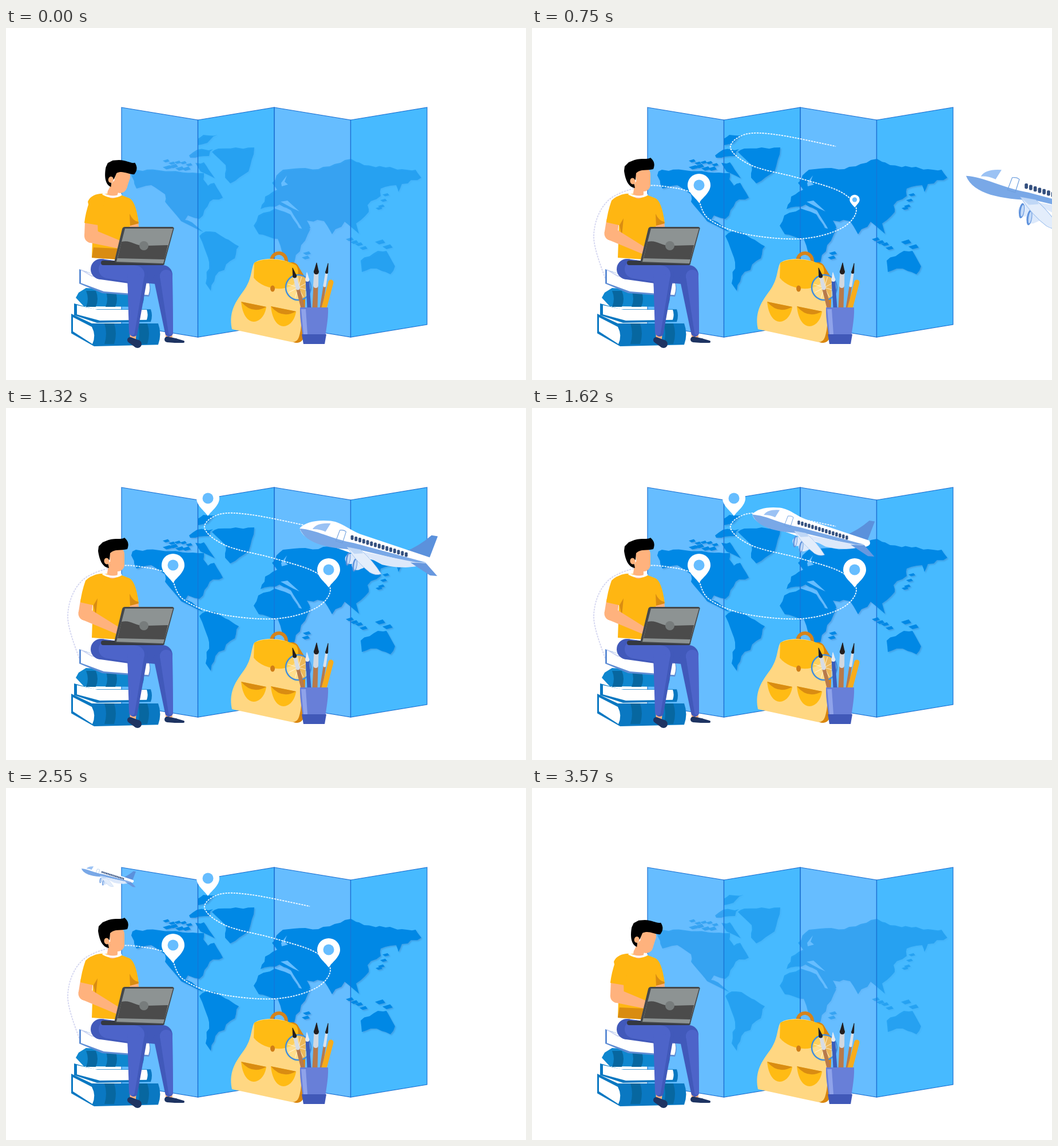
Animation of 909 by 616 pixels, one loop 3.6 s. Source, as an HTML page with a canvas:

```html
<!DOCTYPE html>
<html lang="en">
<head>
<meta charset="utf-8">
<style>
html, body { margin: 0; width: 100%; height: 100%; overflow: hidden; background: #fff; }
canvas { display: block; width: 909px; height: 616px; }
</style>
</head>
<body>
<canvas id="stage" width="909" height="616"></canvas>
<script>
const ctx = document.getElementById('stage').getContext('2d');
const LOOP = 3600;
const SKIN = '#ffb27d', SHIRT = '#ffb612', SHADE = '#d98c12';
const COVER = '#0a78c2', TEAL = '#0767a0', JEANS = '#4d64c9', JEANS_DARK = '#4159ba';

const clamp = v => Math.max(0, Math.min(1, v));
const ease = v => { v = clamp(v); return v * v * (3 - 2 * v); };
const mix = (a, b, k) => a.map((v, i) => v + (b[i] - v) * k);

const paths = new Map();
function shape(d) {
  if (d instanceof Path2D) return d;
  if (!paths.has(d)) paths.set(d, new Path2D(d));
  return paths.get(d);
}
function fill(color, d) {
  ctx.fillStyle = color;
  ctx.fill(shape(d));
}
function stroke(color, width, d) {
  ctx.strokeStyle = color;
  ctx.lineWidth = width;
  ctx.stroke(shape(d));
}
function ellipse(color, x, y, rx, ry = rx, turn = 0) {
  ctx.fillStyle = color;
  ctx.beginPath();
  ctx.ellipse(x, y, rx, ry, turn, 0, Math.PI * 2);
  ctx.fill();
}
function group(draw) {
  ctx.save();
  draw();
  ctx.restore();
}
function pairs(text) {
  const n = text.trim().split(/\s+/).map(Number);
  return Array.from({ length: n.length / 2 }, (_, i) => [n[2 * i], n[2 * i + 1]]);
}

// Tapered tube through joints [x, y, radius].
function limb(color, ...joints) {
  joints.forEach(([x, y, r], i) => {
    ellipse(color, x, y, r);
    if (!i) return;
    const [px, py, pr] = joints[i - 1];
    const a = Math.atan2(y - py, x - px) + Math.PI / 2, c = Math.cos(a), s = Math.sin(a);
    ctx.beginPath();
    ctx.moveTo(px + c * pr, py + s * pr);
    ctx.lineTo(x + c * r, y + s * r);
    ctx.lineTo(x - c * r, y - s * r);
    ctx.lineTo(px - c * pr, py - s * pr);
    ctx.fill();
  });
}

// Smooth curve through a few points.
function curve(text) {
  const p = pairs(text), path = new Path2D();
  const at = i => p[Math.max(0, Math.min(p.length - 1, i))];
  path.moveTo(...p[0]);
  for (let i = 0; i < p.length - 1; i++) {
    const [a, b, c, d] = [at(i - 1), at(i), at(i + 1), at(i + 2)];
    path.bezierCurveTo(b[0] + (c[0] - a[0]) / 6, b[1] + (c[1] - a[1]) / 6,
      c[0] - (d[0] - b[0]) / 6, c[1] - (d[1] - b[1]) / 6, ...c);
  }
  return path;
}

// Coastlines: a rough outline, broken up by small seeded bays.
let seed = 7;
function random() {
  seed = seed * 16807 % 2147483647;
  return seed / 2147483647;
}
function addCoast(path, text) {
  const p = pairs(text);
  p.forEach((a, i) => {
    const b = p[(i + 1) % p.length];
    const steps = Math.ceil(Math.hypot(b[0] - a[0], b[1] - a[1]) / 11);
    for (let j = 0; j < steps; j++) {
      const wobble = j ? random() * 4 - 2 : 0;
      const [x, y] = mix(a, b, j / steps);
      path[i || j ? 'lineTo' : 'moveTo'](x + wobble, y + wobble);
    }
  });
  path.closePath();
}
function addIslands(path, count, x, y, dx, dy, size) {
  for (let i = 0; i < count; i++) {
    const cx = x + dx * i, cy = y + dy * i + random() * 6 - 3;
    path.moveTo(cx - size, cy);
    path.lineTo(cx + size * .5, cy - size * .45);
    path.lineTo(cx + size, cy + size * .2);
    path.lineTo(cx - size * .2, cy + size * .5);
    path.closePath();
  }
}
const land = new Path2D();
addCoast(land, '219 258 227 248 268 249 346 254 345 265 353 276 364 271 379 297 356 304 338 334 318 328 313 336 325 340 345 357 306 338 278 304 278 291 254 275 228 281');
addCoast(land, '335 194 345 187 370 187 352 201 336 205');
addCoast(land, '320 223 334 213 362 212 355 224 322 227');
addCoast(land, '331 236 346 235 365 263 340 251');
addCoast(land, '360 217 371 211 434 209 424 251 392 272 383 262 384 240');
addCoast(land, '338 364 349 356 366 357 407 382 400 403 366 434 358 460 349 447 355 410');
addCoast(land, '465 271 478 253 494 247 546 247 603 229 626 240 692 247 716 248 726 262 692 273 686 287 682 275 655 281 655 294 632 310 634 322 612 342 617 360 592 339 570 361 556 338 526 337 532 350 519 355 498 319 478 309 445 317 453 295 474 283');
addCoast(land, '433 346 441 328 470 316 497 326 512 350 532 352 516 380 500 417 485 400 475 369 442 361');
addCoast(land, '620 407 650 390 659 391 665 390 680 417 672 431 648 421 622 427');
addIslands(land, 5, 280, 234, 10, 1, 6);
addIslands(land, 4, 282, 244, 11, 0, 8);
addIslands(land, 4, 601, 367, 8, 5, 7);
addIslands(land, 2, 654, 377, 13, 4, 9);
addIslands(land, 4, 664, 291, -4, 9, 6);
addIslands(land, 2, 526, 396, -2, 8, 7);
const seas = 'M480 304L492 302 513 321 502 316ZM481 271L491 258 487 269 493 274 482 277Z';

function drawMap(landAlpha) {
  for (let i = 0; i < 4; i++) {
    const x = 202 + i * 133.5, left = i % 2 ? 161 : 139, right = 300 - left;
    const d = `M${x} ${left}L${x + 133.5} ${right}v380L${x} ${left + 380}Z`;
    fill(i % 2 ? '#47baff' : '#66bdff', d);
    stroke('#1c70d2', 1.2, d);
  }
  group(() => {
    ctx.globalAlpha = landAlpha;
    ctx.shadowColor = `rgba(50,110,180,${.3 * landAlpha})`;
    ctx.shadowOffsetX = ctx.shadowOffsetY = 2;
    ctx.shadowBlur = 2;
    fill('#0088e5', land);
  });
  fill('#66bdff', seas);
  stroke('rgba(28,112,210,.75)', 1.2, 'M335.5 161V541M469 139V519M602.5 161V541');
}

const approach = curve('131 447 108 365 132 303 195 277 250 280 292 291');
const journey = curve('292 303 310 335 370 360 468 369 540 351 567 318 540 287 468 263 385 241 347 210 373 186 430 187 531 207');
function drawRoute(color, alpha, ...lines) {
  group(() => {
    ctx.globalAlpha = alpha;
    ctx.setLineDash([3.2, 1.6]);
    for (const line of lines) stroke(color, 1.8, line);
  });
}
function drawPin([x, y], scale) {
  group(() => {
    ctx.translate(x, y);
    ctx.scale(scale, scale);
    fill('#fff', 'M0 0C-5 -8 -20 -18 -20 -31A20 20 0 0 1 20 -31C20 -18 5 -8 0 0Z');
    ellipse('#66bdff', 0, -31, 9.5);
  });
}

// The plane recedes along a straight line, fastest near the middle.
function drawPlane(t) {
  const s = t / 1000;
  const x = 654 - 631 * Math.tanh((s - 1.28) / 1.3), y = 118.5 + .2 * x;
  const scale = 1.1 * (1 - (s / 3.1) ** 2);
  if (s < .2 || scale <= 0) return;
  group(() => {
    ctx.translate(x, y);
    ctx.scale(scale, scale);
    ctx.translate(-764, -272);
    fill('#5b91dc', 'M832 280Q862 268 886 247L898 249L880 296Z');
    fill('#fff', 'M630 233C640 222 662 216 690 219C714 222 730 240 752 246L886 291Q892 302 876 305L835 309C790 303 735 283 700 271C665 264 633 252 630 233Z');
    fill('#79a8e7', 'M630 234C662 236 690 254 735 262L876 300L850 300L745 275C690 274 642 265 630 234Z');
    fill('#dce8fa', 'M738 276L874 303Q835 315 790 304Z');
    fill('#6798df', 'M845 300L875 301L897 326L883 325Z');
    fill('#9bc2f4', 'M655 235Q663 222 690 224L680 240Q667 234 655 235Z');
    stroke('#6fa0df', 1.2, 'M708 237Q716 236 720 240L713 262L700 258Z');
    for (let i = 0; i < 15; i++) {
      ctx.fillStyle = '#34507f';
      ctx.beginPath();
      ctx.roundRect(729 + i * 7.5, 247 + i * 2.35, 5.5, 9, 2);
      ctx.fill();
    }
    for (const ex of [729, 742]) {
      const ey = 293 + (ex - 729) * .9;
      limb('#dce9fb', [ex - 1, ey, 10], [ex + 7, ey - 2, 9]);
      ellipse('#5d91dc', ex - 5, ey, 4.5, 13, .15);
      ellipse('#c5dbf8', ex - 4, ey, 2.5, 10, .15);
    }
    const wing = 'M722 270L748 275Q772 296 788 322Q778 326 766 319Q741 300 722 270Z';
    fill('#e3edfb', wing);
    stroke('#9fc1ee', 1, wing);
    fill('#bfd7f6', 'M722 270L748 275L753 282L736 283Z');
  });
}

function drawBackpack() {
  stroke('#d5831a', 6, 'M464 407C466 388 492 390 490 411');
  limb('#d9860e', [500, 422, 12], [511, 442, 13], [508, 538, 13]);
  fill('#ffd782', 'M395 527C388 492 406 474 418 456C430 438 428 422 434 411C446 400 490 402 505 416C516 440 522 515 512 541Q508 552 497 549Z');
  fill('#ffbb14', 'M434 411C450 402 485 403 507 415C515 425 509 447 497 452C478 461 447 455 433 437Z');
  ellipse('#d07d16', 466, 456, 4, 5.5);
  for (const [x, y] of [[411, 479], [463, 487]]) {
    group(() => {
      ctx.translate(x, y);
      fill('#ffbb14', 'M0 0L44 9C40 40 5 50 0 0Z');
      fill(SHADE, 'M0 0L44 9Q19 23 0 0Z');
    });
  }
}

// Upright tool: handle, ferrule and tip along a line from foot to top.
function drawTool(foot, top, width, handle, ferrule, tip) {
  const at = k => mix(foot, top, k);
  const part = (color, from, to, w) => limb(color, [...at(from), w / 2], [...at(to), w / 2 * .9]);
  part(handle, 0, .5, width);
  part(ferrule, .5, .75, width);
  limb(tip, [...at(.8), width / 2], [...at(1), .5]);
}
function drawCup() {
  ellipse('rgba(255,226,150,.55)', 511, 454, 21);
  for (let i = 0; i < 4; i++) {
    const a = i * Math.PI / 4 + .3, c = 19 * Math.cos(a), s = 19 * Math.sin(a);
    stroke('rgba(255,255,255,.7)', 1, `M${511 - c} ${454 - s}L${511 + c} ${454 + s}`);
  }
  stroke('#418fdd', 2.5, 'M489 454a22 22 0 1 1 44 0a22 22 0 1 1 -44 0');
  drawTool([519, 490], [501, 420], 7, '#b87a4b', '#d6dce4', '#231f20');
  drawTool([530, 490], [526, 428], 7, '#3b5dbb', '#3b5dbb', '#e4e9f2');
  drawTool([540, 490], [543, 411], 9, '#b87a4b', '#d3d8df', '#231f20');
  drawTool([551, 490], [563, 412], 5, '#b87a4b', '#dce1e8', '#231f20');
  limb('#f7ac1b', [556, 490, 4.5], [568, 445, 4.5]);
  fill('#687fd8', 'M514 489H563C564 512 558 532 557 553H520C519 532 513 512 514 489Z');
  fill('#4058b8', 'M517 536H560L557 553H520Z');
  fill('#8fa3ea', 'M516 492H524L527 536H520Z');
}

function slab(color, x, y, w, h, tilt = 0) {
  fill(color, `M${x} ${y}l36 ${h * .3}L${x + w} ${y + h * .3 + tilt}q${h * .12} ${h * .33} 0 ${h * .65}L${x + 40} ${y + h}L${x} ${y + h * .6}Z`);
}
function bands(y, h, ...places) {
  for (const x of places) fill(TEAL, `M${x} ${y}h17q6 ${h / 2} 0 ${h}h-17q6 ${-h / 2} 0 ${-h}Z`);
}
function drawBooks() {
  slab(COVER, 114, 500, 152, 57);
  bands(517, 36, 172, 230);
  fill('#fff', 'M117 506L150 523Q158 538 151 553L117 531Z');
  slab(COVER, 119, 482, 134, 34);
  slab('#fff', 124, 485, 122, 27);
  fill('#0f87cf', 'M127 463L140 455L240 461Q244 476 236 488L136 487L122 472Z');
  bands(460, 28, 140, 174);
  slab('#5d8cd4', 128, 422, 122, 42, 8);
  slab('#fff', 131, 424, 118, 37, 8);
  stroke('#ccd5f3', 2, 'M131 423L150 434L248 447');
}

function drawHead(k) {
  group(() => {
    ctx.translate(188, 290);
    ctx.rotate((1 - k) * .31);
    ctx.translate(-188, -290);
    limb(SKIN, [187, 275, 8], [186, 290, 9]);
    limb(SKIN, [194, 256, 13], [195, 274, 12]);
    fill('#000', 'M162 242L169 235L179 231C193 227 201 231 207 227Q217 235 212 247C201 250 190 246 182 254L181 265L178 270L180 280C169 279 163 266 161 250Z');
    ellipse(SKIN, 176, 268, 4.5, 5.5, -.2);
  });
}

function drawMan(k) {
  limb(SKIN, [284, 530, 6], [285, 541, 6]);
  limb(SKIN, [222, 530, 6], [222, 544, 5]);
  limb('#1e3462', [282, 545, 5], [296, 547, 4], [310, 549, 2]);
  limb('#1e3462', [217, 546, 5], [230, 553, 7]);
  limb(JEANS_DARK, [230, 430, 15], [274, 432, 17], [285, 533, 7]);
  limb(JEANS, [280, 434, 11], [288, 533, 4]);
  limb(JEANS_DARK, [166, 422, 18], [230, 431, 18], [223, 533, 7]);
  limb(JEANS, [178, 422, 16], [227, 431, 15], [220, 533, 5]);

  limb(SKIN, [224, 335, 7], [223, 349, 9]);
  fill(SHIRT, 'M173 290C158 289 147 294 143 304L152 345L150 402L195 405L217 345L232 341Q227 304 216 298L203 293Z');
  fill(SHADE, 'M216 325Q222 338 231 339L232 342L217 346Z');
  fill(SHADE, 'M153 345L160 333L157 364Z');
  group(() => {
    ctx.globalAlpha = 1 - k;
    fill(SHADE, 'M153 384L196 386L195 405L150 402Z');
  });
  limb(SKIN, mix([149, 338, 11], [141, 338, 11], k), mix([149, 364, 12], [138, 360, 11.5], k), mix([198, 379, 7], [198, 391, 6], k));
  const [sx, sy, ax, ay] = mix([137, 341, 161, 345], [130, 340, 152, 345], k);
  fill(SHIRT, `M173 291Q150 290 ${sx + 9} ${sy - 38}Q${sx + 2} ${sy - 18} ${sx} ${sy}L${ax} ${ay}L172 305Z`);
  drawHead(k);
  stroke('#fff', 3.5, 'M169 290Q187 300 202 291');

  limb('#343840', [170, 411, 4], [274, 412, 3]);
  fill('#45484b', 'M208 348H291Q295 349 293 353L277 412Q275 415 271 414L193 411Q189 410 190 406L203 352Q204 348 208 348Z');
  fill('#8d9393', 'M208 351H292L275 412L193 409Z');
  fill('#4b4b4b', 'M202 374C218 370 226 382 245 381L283 380L277 405L195 403Z');
  ellipse('#777c7c', 241, 381, 8);
}

function render(t) {
  const awake = ease(Math.min(t, LOOP - t) / 465);
  const leave = 1 - ease((t - 2830) / 330);
  const route = ease((t - 30) / 330) * leave;

  ctx.fillStyle = '#fff';
  ctx.fillRect(0, 0, 909, 616);
  drawRoute('#d3d5f0', route, approach);
  drawMap(.45 + .55 * awake);
  group(() => {
    ctx.beginPath();
    ctx.rect(202, 0, 707, 616);
    ctx.clip();
    drawRoute('#f4faff', route, approach, journey);
  });
  [[292, 306], [564, 314], [353, 189]].forEach((spot, i) => {
    const grow = ease((t - 270 - 330 * i) / 330) * leave;
    if (grow > 0) drawPin(spot, grow);
  });
  drawPlane(t);
  drawBackpack();
  drawCup();
  drawBooks();
  drawMan(awake);
}

const begin = performance.now();
function tick() {
  render((performance.now() - begin) % LOOP);
  requestAnimationFrame(tick);
}
tick();
</script>
</body>
</html>
```
